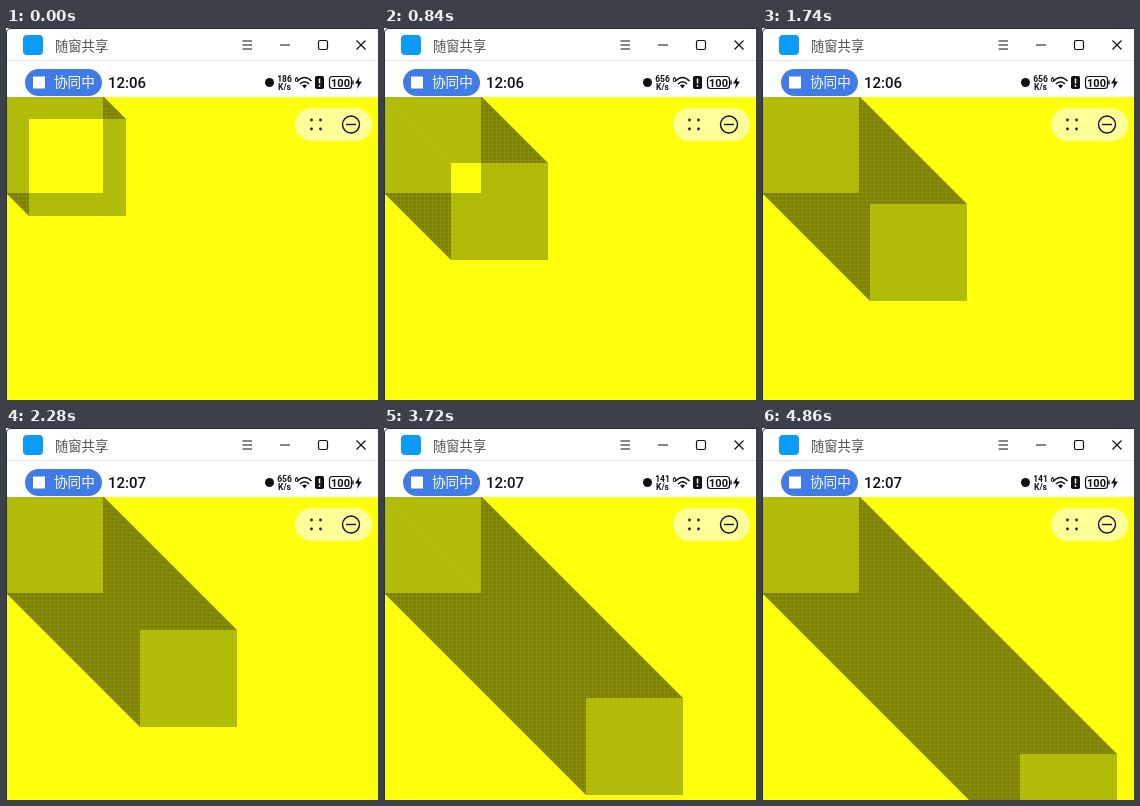
Animation, 372 px wide and 372 px high, one loop 4920 ms. Source, as an HTML page:

```html
<!DOCTYPE html>
<html lang="zh-CN">
<head>
<meta charset="utf-8">
<style>
html, body { margin: 0; width: 100%; height: 100%; overflow: hidden; background: #fff; }
svg { display: block; width: 100vw; height: 100vh; }
.cjk { font-family: "Noto Sans CJK SC", sans-serif; }
.num { font-family: Roboto, sans-serif; }
.line { fill: none; stroke: #111; }
</style>
</head>
<body>
<svg viewBox="0 0 372 372">
  <rect width="372" height="372" fill="#feff0a"/>

  <g id="trail">
    <path id="sweep" fill="#7d8206"/>
    <rect y="68" width="97" height="97" fill="#b0ba08"/>
    <rect id="front" width="97" height="97" fill="#b0ba08"/>
    <rect id="hole" fill="#feff0a"/>
    <path id="grain" fill="none" stroke="#e2ec20" stroke-opacity=".1"/>
  </g>

  <rect width="372" height="69" fill="#fff"/>
  <path d="M0 32.5H372" stroke="#e4e4e4"/>
  <path d="M.5 372V5Q.5 .5 5 .5H372" fill="none" stroke="#222b50"/>

  <rect x="17" y="7" width="20" height="20" rx="4" fill="#0a9bfb"/>
  <text class="cjk" x="49" y="22.5" font-size="13.3" fill="#505050">随窗共享</text>
  <g class="line" stroke-width="1.2">
    <path d="M236.500 13H246M236.500 17H246M236.500 21H246M274 17H284"/>
    <rect x="312.500" y="12.500" width="9" height="9" rx="1.500"/>
    <path d="M350.500 12.500L359.500 21.500M359.500 12.500L350.500 21.500"/>
  </g>

  <rect x="19" y="41" width="77" height="27" rx="13.5" fill="#417be8"/>
  <rect x="27" y="48.500" width="12" height="12" fill="#fff"/>
  <text class="cjk" x="48" y="59.3" font-size="13.6" font-weight="500" fill="#fff">协同中</text>
  <text id="clock" class="num" x="102" y="60" font-size="15" font-weight="500" fill="#111"></text>

  <circle cx="263.500" cy="54.500" r="4.500" fill="#111"/>
  <g class="num" font-weight="700" fill="#111" text-anchor="middle">
    <text id="speed" x="278.500" y="53.500" font-size="8.5"></text>
    <text x="278.500" y="61.500" font-size="8.5">K/s</text>
    <text x="290.500" y="53.500" font-size="7">6</text>
    <text x="334.500" y="58.700" font-size="11">100</text>
  </g>
  <g class="line" stroke-width="1.6">
    <path d="M291.500 53Q298.500 46 305.500 53M294 56Q298.500 51.500 303 56"/>
    <rect x="323.500" y="48.500" width="22" height="12" rx="3" stroke-width="1.2"/>
  </g>
  <path d="M296 57.500Q298.500 55.500 301 57.500L298.500 60.500Z" fill="#111"/>
  <path d="M347 52.500V56.500" stroke="#111" stroke-width="1.4"/>
  <path d="M353.500 48.500L349 55.500H352L351 61L356 53.500H352.800Z" fill="#111"/>
  <rect x="309" y="48" width="9" height="13" rx="1.8" fill="#111"/>
  <path d="M313.500 50.500V55.500M313.500 57V58.700" stroke="#fff" stroke-width="1.5"/>

  <rect x="289" y="80" width="77" height="33" rx="16.5" fill="#feff98"/>
  <g fill="#222">
    <circle cx="305.500" cy="92" r="1.4"/><circle cx="314.500" cy="92" r="1.4"/>
    <circle cx="305.500" cy="101" r="1.4"/><circle cx="314.500" cy="101" r="1.4"/>
  </g>
  <g class="line" stroke-width="1.4">
    <circle cx="345" cy="96.500" r="8.500"/>
    <path d="M340 96.500H350"/>
  </g>
</svg>
<script>
const LOOP = 4920, TICK = 60, SIZE = 97, TOP = 68;
const $ = id => document.getElementById(id);

// Ticks on which the picture stands still.
const holds = [3, 9, 15, 21, 27, 33, 39, 46, 49, 56, 61, 68, 73, 79];
// [step, offset of the front square]
const keys = [[0, 23], [7, 48], [12, 67], [15, 77], [22, 100], [24, 108], [30, 128], [32, 134],
  [38, 156], [41, 168], [46, 185], [51, 202], [54, 212], [61, 237], [67, 258]];

function offsetAt(t) {
  const tick = Math.floor(t / TICK);
  const step = tick - holds.filter(h => h <= tick).length;
  const i = Math.max(1, keys.findIndex(k => k[0] >= step));
  const [s0, d0] = keys[i - 1], [s1, d1] = keys[i];
  return Math.round(d0 + (d1 - d0) * (step - s0) / (s1 - s0));
}

function set(el, attrs) {
  for (const name in attrs) el.setAttribute(name, attrs[name]);
}

function draw(t) {
  const d = offsetAt(t), gap = Math.max(0, SIZE - d);
  set($("sweep"), { d: `M0 ${TOP}h${SIZE}l${d} ${d}v${SIZE}h${-SIZE}l${-d} ${-d}z` });
  set($("front"), { x: d, y: TOP + d });
  set($("hole"), { x: d, y: TOP + d, width: gap, height: gap });

  let grain = "";
  for (let k = 4; k <= d; k += 4) {
    grain += `M${k + .5} ${TOP + k + .5}h${SIZE - 1}v${SIZE - 1}h${1 - SIZE}z`;
  }
  set($("grain"), { d: grain });

  $("clock").textContent = t < 1980 ? "12:06" : "12:07";
  $("speed").textContent = t < 240 ? "186" : t < 3240 ? "656" : "141";
}

const start = performance.now();
function frame() {
  draw((performance.now() - start) % LOOP);
  requestAnimationFrame(frame);
}
frame();
</script>
</body>
</html>
```
